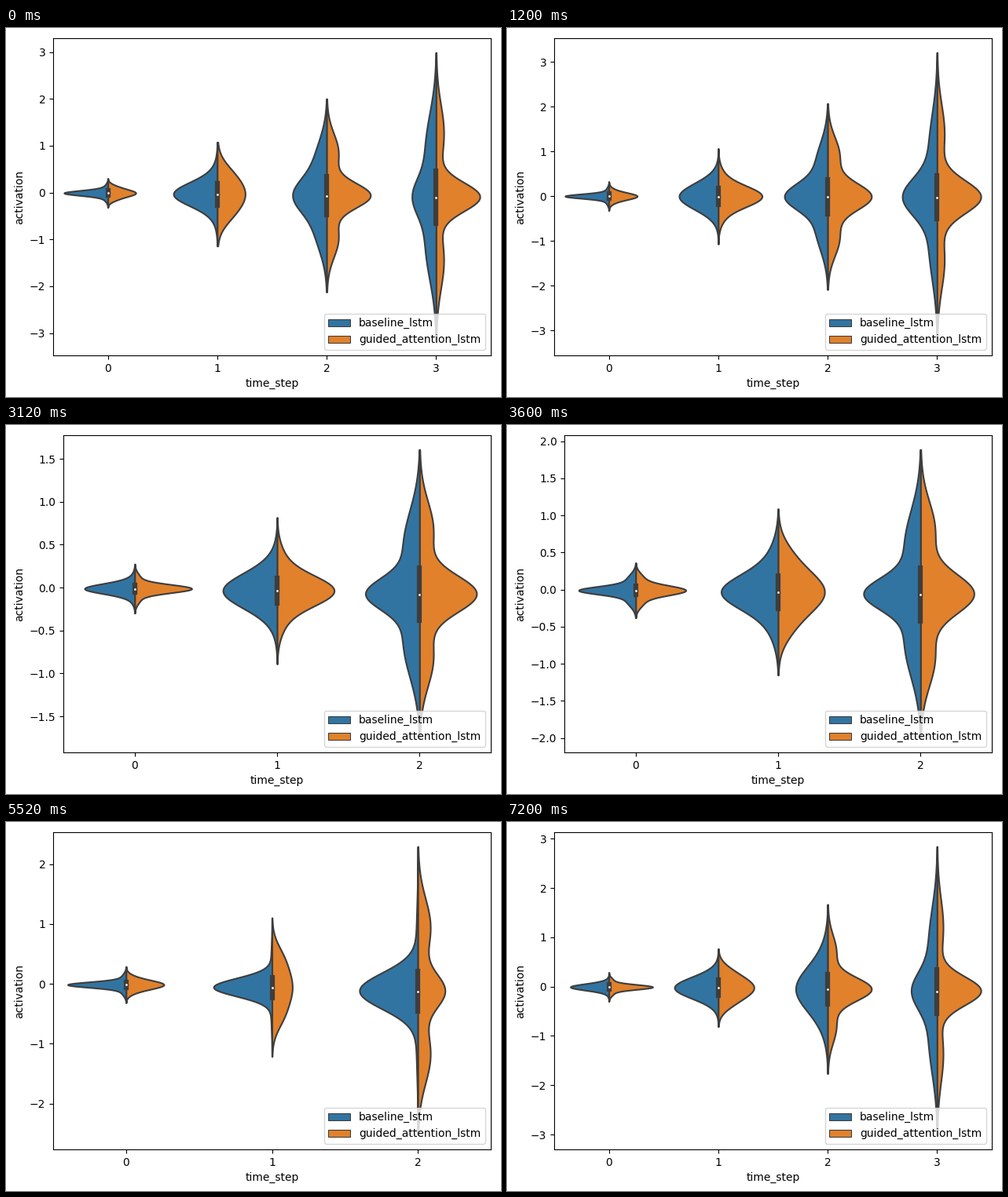
These frames come from a looping animation (630x470 px, 8 s). A matplotlib script:

```python
import numpy as np
import matplotlib.pyplot as plt
from matplotlib.animation import FuncAnimation
from matplotlib.patches import Patch

WIDTH, HEIGHT, DPI = 630, 470, 100
TOP, BOTTOM, RIGHT = 13, 417, 617
MARGIN = (BOTTOM - TOP) / 22
GRAY = "#3d3d3d"

# side, colour, label, then offset and spread of the two shoulders
SIDES = [
    (-1, "#3274a1", "baseline_lstm", 0.33, 0.25),
    (1, "#e1812c", "guided_attention_lstm", 0.44, 0.20),
]

fig = plt.figure(figsize=(WIDTH / DPI, HEIGHT / DPI), dpi=DPI, facecolor="white")
scenes = []


def bell(u, centre, spread):
    return np.exp(-((u - centre) / spread) ** 2 / 2)


def density(u, core, tail, offset, spread):
    """A central bell with a shoulder above and below, scaled to unit area."""
    d = bell(u, 0, core) + tail * (bell(u, offset, spread) + bell(u, -offset, spread))
    return d / d.sum()


def draw_violin(ax, x, y, halves):
    u = np.linspace(-1, 1, len(y))
    shapes = [density(u, *half, *side[3:]) for half, side in zip(halves, SIDES)]
    widest = np.max(shapes)
    for shape, (side, color, *_) in zip(shapes, SIDES):
        ax.fill_betweenx(y, x, x + side * 0.4 * shape / widest,
                         facecolor=color, edgecolor=GRAY, linewidth=1.5)
    share = np.cumsum(sum(shapes)) / 2
    low, mid, high = np.interp([0.25, 0.5, 0.75], share, y)
    ax.plot([x, x], [low, high], color=GRAY, linewidth=4.5)
    ax.scatter(x, mid, s=9, zorder=3, facecolor="white", edgecolor=GRAY)


def add_scene(left, zero, unit, first, power, *violins):
    """Violins grow from the share `first` of the full reach along a power curve.

    Each violin holds a (core, tail) pair for each side.
    """
    ax = fig.add_axes([left / WIDTH, 1 - BOTTOM / HEIGHT,
                       (RIGHT - left) / WIDTH, (BOTTOM - TOP) / HEIGHT])
    last = len(violins) - 1
    highest = (zero - TOP - MARGIN) / unit
    lowest = (zero - BOTTOM + MARGIN) / unit
    for k, halves in enumerate(violins):
        reach = first + (1 - first) * (k / last) ** power
        draw_violin(ax, k, reach * np.linspace(lowest, highest, 300), halves)

    ax.set_xlim(-0.5, last + 0.5)
    ax.set_ylim((zero - BOTTOM) / unit, (zero - TOP) / unit)
    ax.set_xticks(range(last + 1))
    ax.set_xlabel("time_step")
    ax.set_ylabel("activation")
    ax.legend(handles=[Patch(facecolor=color, edgecolor=GRAY, linewidth=0.75, label=label)
                       for _, color, label, *_ in SIDES], loc="lower right")
    scenes.append(ax)


add_scene(60, 209.6, 59.67, 0.10, 1.13,
          [(0.17, 0.10), (0.25, 0.20)],
          [(0.22, 0.10), (0.36, 0.10)],
          [(0.17, 0.50), (0.13, 0.28)],
          [(0.13, 0.70), (0.10, 0.18)])
add_scene(60, 214.1, 57, 0.10, 1.24,
          [(0.15, 0.08), (0.24, 0.10)],
          [(0.27, 0.03), (0.22, 0.08)],
          [(0.14, 0.37), (0.145, 0.28)],
          [(0.13, 0.30), (0.115, 0.17)])
add_scene(73.2, 207.1, 109.33, 0.17, 1.30,
          [(0.20, 0.10), (0.17, 0.09)],
          [(0.23, 0.10), (0.21, 0.10)],
          [(0.11, 0.40), (0.13, 0.25)])
add_scene(73.2, 209.6, 94.5, 0.19, 1.07,
          [(0.14, 0.20), (0.18, 0.15)],
          [(0.20, 0.20), (0.25, 0.19)],
          [(0.11, 0.37), (0.14, 0.28)])
add_scene(60, 206.1, 76.25, 0.125, 1.30,
          [(0.15, 0.10), (0.25, 0.10)],
          [(0.13, 0.02), (0.28, 0.35)],
          [(0.125, 0.03), (0.12, 0.50)])
add_scene(60, 209.6, 73.3, 0.125, 1.22,
          [(0.18, 0.05), (0.20, 0.10)],
          [(0.125, 0.02), (0.20, 0.38)],
          [(0.09, 0.08), (0.11, 0.66)])
add_scene(60, 209.6, 62.8, 0.10, 1.52,
          [(0.22, 0.05), (0.17, 0.10)],
          [(0.27, 0.03), (0.29, 0.15)],
          [(0.24, 0.20), (0.14, 0.20)],
          [(0.13, 0.45), (0.10, 0.14)])


def update(i):
    # each plot holds for three ticks, the last for two
    for k, ax in enumerate(scenes):
        ax.set_visible(k == i // 3)
    return scenes


anim = FuncAnimation(fig, update, frames=20, interval=400, repeat=True,
                     repeat_delay=0, blit=False)
plt.show()
```
